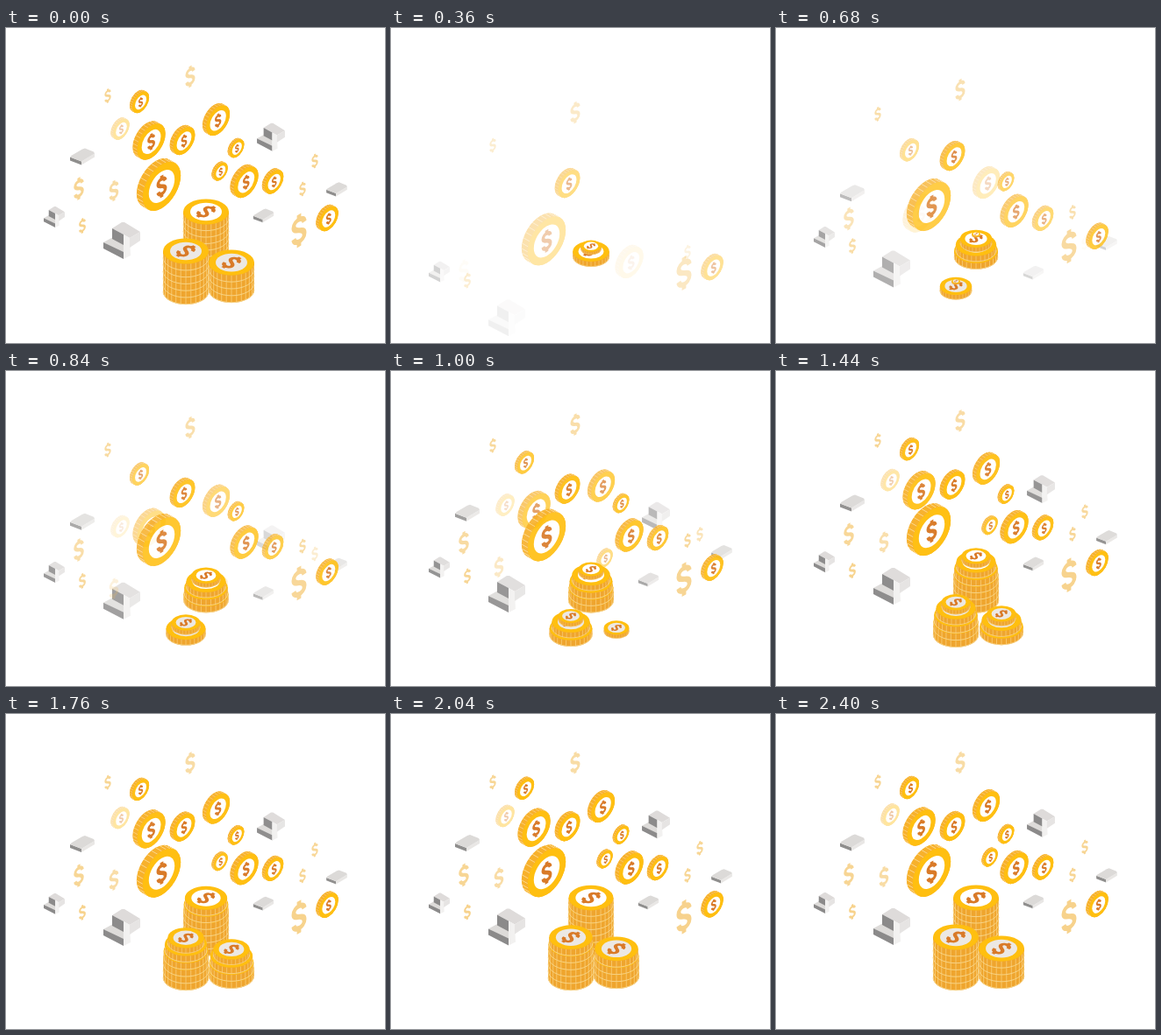
An HTML page with a canvas that plays this animation: 432x360 px, repeating every 4000 ms.

```html
<!DOCTYPE html>
<html lang="en">
<head>
<meta charset="utf-8">
<title>Growing coin stacks</title>
<style>
html, body { margin: 0; width: 100%; height: 100%; overflow: hidden; background: #fff; }
canvas { display: block; width: 432px; height: 360px; }
</style>
</head>
<body>
<canvas id="stage" width="432" height="360"></canvas>
<script>
const W = 432, H = 360, LOOP = 4000, STEP = 40, BEGIN = 40, END = 2400;
const RISE = 100, RISE_TAU = 320, POP_TAU = 200;
const GOLD = '#ffbf10', SIDE = '#f7b12c', TICK = '#fddc95', INK = '#d97a28', PALE = '#f4c05c';

const view = document.getElementById('stage').getContext('2d');
const layer = document.createElement('canvas');
layer.width = W;
layer.height = H;
const g = layer.getContext('2d');

function disc(c, x, y, rx, ry, color) {
  c.fillStyle = color;
  c.beginPath();
  c.ellipse(x, y, rx, ry, 0, 0, Math.PI * 2);
  c.fill();
}

// Dollar sign of half height 1, centred on the current origin
function dollar(c, size, color, weight = 0.3) {
  c.save();
  c.scale(size, size);
  c.strokeStyle = color;
  c.lineWidth = weight;
  c.beginPath();
  c.moveTo(0.38, -0.36);
  c.bezierCurveTo(0.34, -0.78, -0.38, -0.8, -0.38, -0.38);
  c.bezierCurveTo(-0.38, 0.06, 0.38, -0.1, 0.38, 0.38);
  c.bezierCurveTo(0.38, 0.8, -0.34, 0.78, -0.38, 0.36);
  c.moveTo(0, -1);
  c.lineTo(0, -0.65);
  c.moveTo(0, 0.65);
  c.lineTo(0, 1);
  c.stroke();
  c.restore();
}

function upright(c, x, y) {
  c.translate(x, y);
  c.transform(0.866, -0.5, 0, 1, 0, 0);
}

function coin(c, r) {
  const dx = r * 0.14, dy = r * 0.08;
  for (let i = -8; i <= 8; i++) {
    c.save();
    upright(c, dx * i / 8, dy * i / 8);
    disc(c, 0, 0, r, r, SIDE);
    c.restore();
  }
  c.strokeStyle = TICK;
  c.lineWidth = Math.max(0.5, r * 0.035);
  c.beginPath();
  for (let i = 0; i < 28; i++) {
    const a = i * Math.PI / 14;
    const px = Math.cos(a) * r * 0.866;
    const py = Math.sin(a) * r - Math.cos(a) * r * 0.5;
    c.moveTo(px - dx, py - dy);
    c.lineTo(px + dx, py + dy);
  }
  c.stroke();
  c.save();
  upright(c, dx, dy);
  disc(c, 0, 0, r, r, GOLD);
  disc(c, 0, 0, r * 0.68, r * 0.68, '#fff');
  dollar(c, r * 0.5, INK, 0.34);
  c.restore();
}

function sign(c, size) {
  c.save();
  upright(c, 0, 0);
  dollar(c, size, PALE);
  c.restore();
}

function poly(c, color, ...p) {
  c.fillStyle = color;
  c.beginPath();
  for (let i = 0; i < p.length; i += 2) c.lineTo(p[i], p[i + 1]);
  c.closePath();
  c.fill();
}

function slab(c, k) {
  c.scale(k, k);
  poly(c, '#8f8e8d', -14, 1, -1, 6, -1, 10, -14, 5);
  poly(c, '#e9e7e5', -1, 6, 14, -3, 14, 1, -1, 10);
  poly(c, '#dcdad8', -14, 1, -12, -1, 0, -8, 3, -9, 13, -5, 14, -3, -1, 6);
}

function bundle(c, k) {
  c.scale(k, k);
  poly(c, '#dddbd9', -21, 3, -10, -3, 2, 4, 2, 15);
  poly(c, '#8b8a8a', -21, 3, 2, 14, 2, 22, -21, 10);
  poly(c, '#dedbda', -11, -13, 0, -20, 3, -20, 21, -9, 9, -2, 2, -6);
  poly(c, '#8b8a8a', -11, -13, 2, -6, 2, 6, -11, -1);
  poly(c, '#f2f1f0', 2, -6, 9, -2, 10, 18, 2, 22);
  poly(c, '#e6e4e3', 9, -2, 21, -9, 21, 1, 9, 9);
}

// shape, x, y, size, start time, final opacity
const floats = [
  [slab, 87, 146.5, 1, 400, 1],
  [slab, 377, 184, 0.85, 525, 1],
  [slab, 293.5, 214, 0.83, 543, 1],
  [bundle, 55, 215.5, 0.57, 210, 1],
  [bundle, 132, 242, 1, 320, 1],
  [bundle, 302, 124, 0.76, 715, 1],
  [sign, 210, 55.5, 12, 75, 0.55],
  [sign, 116, 77.5, 8, 178, 0.65],
  [sign, 87, 226, 8.5, 210, 0.7],
  [sign, 334, 231.5, 18.5, 130, 0.7],
  [sign, 338, 184, 8, 255, 0.65],
  [sign, 83, 183.5, 12.5, 340, 0.65],
  [sign, 123, 186, 11.5, 690, 0.55],
  [sign, 352, 152, 8, 660, 0.65],
  [coin, 130, 115, 10.6, 690, 0.4],
  [coin, 163, 128.5, 18.5, 620, 1],
  [coin, 239.5, 104.5, 15.5, 575, 1],
  [coin, 152, 84, 11, 490, 1],
  [coin, 201, 128, 14.3, 132, 1],
  [coin, 262, 137, 9.4, 372, 1],
  [coin, 243.5, 163.5, 9.2, 778, 1],
  [coin, 271.5, 175, 16, 333, 1],
  [coin, 304, 175, 12.2, 405, 1],
  [coin, 366, 217, 12.7, 175, 1],
  [coin, 174, 179, 25, 209, 1]
];

// x, base y, coin thickness, coin count, start time, face colour
const stacks = [
  [228, 262, 7.43, 7, 0, '#fff'],
  [205, 301.5, 7.75, 6, 400, '#ece8e3'],
  [257, 299.5, 7.85, 4, 800, '#ece8e3']
];

function flatCoin(x, y, h, k, face) {
  const rx = 26, ry = 14.6, half = h / 2;
  view.save();
  view.translate(x, y);
  view.scale(k, k);
  disc(view, 0, half, rx, ry, '#efa52e');
  view.fillRect(-rx, -half, rx * 2, h);
  view.strokeStyle = '#f9cb73';
  view.lineWidth = 0.9;
  view.beginPath();
  for (let i = 1; i < 14; i++) {
    const a = i * Math.PI / 14;
    const px = Math.cos(a) * rx, py = Math.sin(a) * ry;
    view.moveTo(px, py - half);
    view.lineTo(px, py + half);
  }
  view.stroke();
  view.strokeStyle = '#f8d791';
  view.beginPath();
  view.ellipse(0, half - 0.4, rx, ry, 0, 0, Math.PI);
  view.stroke();
  disc(view, 0, -half, rx, ry, GOLD);
  disc(view, 0, -half, 18, 10.3, face);
  view.translate(0, -half);
  view.transform(0.866, 0.5, -0.866, 0.5, 0, 0);
  dollar(view, 11.5, INK, 0.32);
  view.restore();
}

function drawFloat([shape, x, y, size, start, alpha], t) {
  if (t < start) return;
  const left = Math.exp((start - t) / RISE_TAU);
  g.clearRect(0, 0, W, H);
  g.save();
  g.translate(x, y + RISE * left);
  shape(g, size);
  g.restore();
  view.globalAlpha = alpha * (1 - left);
  view.drawImage(layer, 0, 0);
  view.globalAlpha = 1;
}

function drawStack([x, base, h, count, start, face], t) {
  for (let i = 0; i < count; i++) {
    const age = t - BEGIN - start - i * 200;
    if (age <= 0) break;
    flatCoin(x, base - h * (i + 0.5), h, 1 - Math.exp(-age / POP_TAU), face);
  }
}

function draw(time) {
  const now = Math.floor(time % LOOP / STEP) * STEP;
  const t = now < BEGIN || now >= END ? 1e5 : now;
  view.fillStyle = '#fff';
  view.fillRect(0, 0, W, H);
  floats.forEach(f => drawFloat(f, t));
  stacks.forEach(s => drawStack(s, t));
}

const origin = performance.now();
function tick() {
  draw(performance.now() - origin);
  requestAnimationFrame(tick);
}
tick();
</script>
</body>
</html>
```
